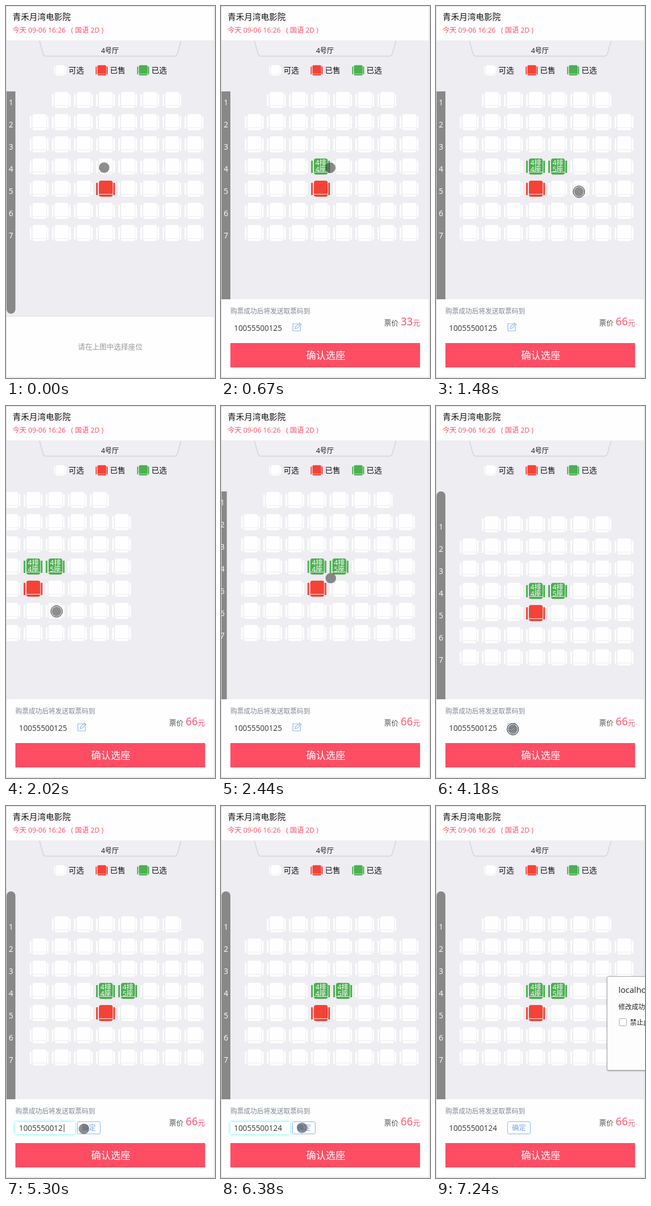
Recreate the animation shown at these times as an HTML page. Size 378 by 671 pixels, loop 8000 ms.

```html
<!DOCTYPE html>
<html lang="zh-CN">
<head>
<meta charset="utf-8">
<style>
  html, body { margin: 0; width: 100%; height: 100%; overflow: hidden; background: #f4f4f4; }
  svg { display: block; width: 378px; height: 671px; }
  text { font-family: "Open Sans", "Noto Sans CJK SC", "Noto Sans CJK", sans-serif; white-space: pre; }
  .mid { text-anchor: middle; }
  .strong { font-weight: 500; }
  .glow { filter: drop-shadow(0 0 3px #5ff0f0); }
  .shadow { filter: drop-shadow(0 1px 1px #0005); }
</style>
</head>
<body>
<svg viewBox="0 0 378 671">
  <defs><clipPath id="hallClip"><rect id="hallWindow" x="1" y="154" width="375" height="405"/></clipPath></defs>
  <rect x=".5" y=".5" width="376" height="669" fill="#fefefe" stroke="#ddd"/>
  <rect id="hall" x="1" y="62" width="375" height="497" fill="#eeedf2"/>
  <path d="M60.5 63 67 86Q68.5 90.5 73 90.5H304Q308.5 90.5 310 86L316.5 63" fill="#f0eff4" stroke="#dadadd" stroke-width="2"/>
  <g id="labels"></g>
  <g clip-path="url(#hallClip)"><g id="seats"></g></g>
  <g id="emptyPanel">
    <path d="M1 559.5H376" stroke="#ddd"/>
    <text class="mid" x="188.5" y="619" font-size="13" fill="#999">请在上图中选择座位</text>
  </g>
  <g id="orderPanel">
    <text x="17" y="555" font-size="12" fill="#808791">购票成功后将发送取票码到</text>
    <rect id="input" class="glow" x="17" y="570" width="108" height="22" fill="#fff"/>
    <text id="phone" x="23.5" y="586" font-size="13.8" fill="#333"></text>
    <path id="caret" d="M105 574V588" stroke="#333"/>
    <g id="editIcon" fill="none" stroke="#93b7ee" stroke-width="1.2">
      <path d="M139 573H130V586H143.5V578"/>
      <path d="M134 582 135 578.5 142 571.5 145 574.5 138 581ZM140.5 573.5 143 576"/>
    </g>
    <g id="confirm">
      <rect x="129.5" y="569.5" width="41" height="22" rx="2" fill="#fff" stroke="#8ab1f6"/>
      <text class="mid" x="150" y="585" font-size="12.5" fill="#76a2f2">确定</text>
    </g>
    <text x="295" y="576" font-size="13" fill="#555">票价</text>
    <text id="price" x="325" y="576" font-size="19.3" fill="#ff4d64"></text>
    <text x="347" y="576" font-size="13" fill="#ff4d64">元</text>
    <rect x="17" y="608" width="343" height="44" fill="#ff4d64"/>
    <text class="mid" x="189.5" y="636.5" font-size="17.7" fill="#fff">确认选座</text>
  </g>
  <g id="dialog">
    <rect class="shadow" x="309.5" y="307.5" width="90" height="169" rx="2" fill="#fdfdfd" stroke="#aaa"/>
    <text x="330" y="337" font-size="15" fill="#222">localhost</text>
    <text x="330" y="367" font-size="12" fill="#222">修改成功</text>
    <rect x="331.5" y="383.5" width="13" height="13" rx="1" fill="#fff" stroke="#aaa"/>
    <text x="351" y="394.5" font-size="12" fill="#222">禁止此页</text>
  </g>
  <g id="pointer">
    <circle r="9.5" fill="#3c3c3c" fill-opacity=".58"/>
    <g id="ring" fill="none"><circle r="9.4" stroke="#fff" stroke-width="1.4"/><circle r="10.3" stroke="#111"/></g>
  </g>
</svg>
<script>
const LOOP = 8000, STEP = 135;
const WHITE = '#fefefe', RED = '#f44336', GREEN = '#4caf50';
const $ = id => document.getElementById(id);
const show = (id, on) => $(id).setAttribute('display', on ? 'inline' : 'none');
const place = (id, {x, y}) => $(id).setAttribute('transform', `translate(${x} ${y})`);
const text = (x, y, size, fill, value, cls = '') =>
  `<text class="${cls}" x="${x}" y="${y}" font-size="${size}" fill="${fill}">${value}</text>`;

// A seat centred on its cushion, 34 by 29 at scale 1.
const seat = (x, y, fill, scale = 1) => `
  <g transform="translate(${x} ${y}) scale(${scale})" fill="${fill}">
    <rect x="-12" y="-14.5" width="25" height="29" rx="4"/>
    <path d="M-17-10.5h3V11.5h-3ZM14-10.5h3V11.5h-3Z"/>
    <path d="M-13 10H14" stroke="${fill === WHITE ? '#ececee' : '#f5e9e9'}"/>
  </g>`;
const columnX = column => 20 + column * 40;
const rowY = row => 129.5 + row * 40;
const picked = column => {
  const x = columnX(column), y = rowY(4);
  return `<g id="picked${column}">${seat(x, y, GREEN)}
    ${text(x + .5, y - 2.5, 12.5, '#fff', '4排', 'mid strong')}
    ${text(x + .5, y + 9.5, 12.5, '#fff', column + '座', 'mid strong')}</g>`;
};

$('labels').innerHTML =
  text(12, 25, 15, '#111', '青禾月湾电影院') +
  text(12, 48, 12.5, '#ff4d64', '今天 09-06 16:26   ( 国语 2D )') +
  text(188, 85, 12.5, '#111', '4号厅', 'mid') +
  [['可选', WHITE], ['已售', RED], ['已选', GREEN]].map(([name, fill], i) =>
    seat(98 + i * 75, 116, fill, .64) + text(113 + i * 75, 121, 14, '#111', name)).join('');

let plan = '<rect x="1" y="110" width="16" height="445" rx="8" fill="#888"/>';
for (let row = 1; row <= 7; row++) {
  plan += text(9, rowY(row) + 9.5, 14, '#fff', row, 'mid strong');
  const inset = row === 1 ? 1 : 0;
  for (let column = 1 + inset; column <= 8 - inset; column++)
    plan += seat(columnX(column), rowY(row), row === 5 && column === 4 ? RED : WHITE);
}
$('seats').innerHTML = plan + picked(4) + picked(5);

const home = {x: 177.5, y: 291.5};
const toSeat5 = {start: 530, end: 800, x: 218, y: 292};
const toEmptySeat = {start: 1205, end: 1475, x: 258.5, y: 335};
const dragLeft = {start: 1475, end: 2015, x: 91.5, y: 370.5};
const toHall = {start: 2150, end: 2555, x: 236, y: 289.5};
const dragDown = {start: 2690, end: 3095, x: 250, y: 352};
const toEdit = {start: 3230, end: 4040, x: 139, y: 583};
const toSave = {start: 4715, end: 6335, x: 146.5, y: 580.5};
const moves = [toSeat5, toEmptySeat, dragLeft, toHall, dragDown, toEdit, toSave];
const clicks = {seat4: 120, seat5: 800, edit: 4100, save: 6830};
const TAP_DELAY = 300, RELEASE_DELAY = STEP;

const between = (t, start, end) => t >= start && t < end;
const ease = k => k * k * (3 - 2 * k);

function pointerAt(t) {
  let {x, y} = home;
  for (const move of moves) {
    const k = ease(Math.min(1, Math.max(0, (t - move.start) / (move.end - move.start))));
    x += (move.x - x) * k;
    y += (move.y - y) * k;
  }
  return {x, y};
}

// The hall lags behind the pointer, then springs to its resting offset.
function scrollOffset(t, drag, axis, rest) {
  if (t < drag.start) return 0;
  const release = drag.end + RELEASE_DELAY;
  const pulled = .785 * (pointerAt(Math.min(t, drag.end))[axis] - pointerAt(drag.start)[axis]);
  return t < release ? pulled : rest + (pulled - rest) * Math.exp((release - t) / 90);
}

function draw(now) {
  const t = Math.max(0, Math.floor((now % LOOP + 10) / STEP) * STEP - 10);
  const ordered = t >= clicks.seat4 + TAP_DELAY + 100;
  const second = t >= clicks.seat5 + TAP_DELAY + 100;
  const editing = t >= clicks.edit + TAP_DELAY;
  const erased = t >= 5240, retyped = t >= 5800;
  const alerted = t >= clicks.save + 170;
  const hallBottom = ordered ? 529 : 559;

  $('hall').setAttribute('height', hallBottom - 62);
  $('hallWindow').setAttribute('height', hallBottom - 154);
  place('seats', {x: scrollOffset(t, dragLeft, 'x', 0), y: scrollOffset(t, dragDown, 'y', 44)});
  show('picked4', ordered);
  show('picked5', second);
  show('emptyPanel', !ordered);
  show('orderPanel', ordered);
  $('price').textContent = second ? '66' : '33';

  show('input', editing && t < clicks.save);
  show('editIcon', !editing);
  show('confirm', editing);
  show('caret', erased && !retyped && t % 1000 < 500);
  $('phone').textContent = '1005550012' + (retyped ? '4' : erased ? '' : '5');

  show('dialog', alerted);
  show('pointer', !alerted);
  show('ring', Object.values(clicks).some(click => between(t, click, click + STEP)) ||
    [dragLeft, dragDown].some(drag => between(t, drag.start, drag.end + RELEASE_DELAY)));
  place('pointer', pointerAt(t));
}

const start = performance.now();
(function tick() {
  draw(performance.now() - start);
  requestAnimationFrame(tick);
})();
</script>
</body>
</html>
```
